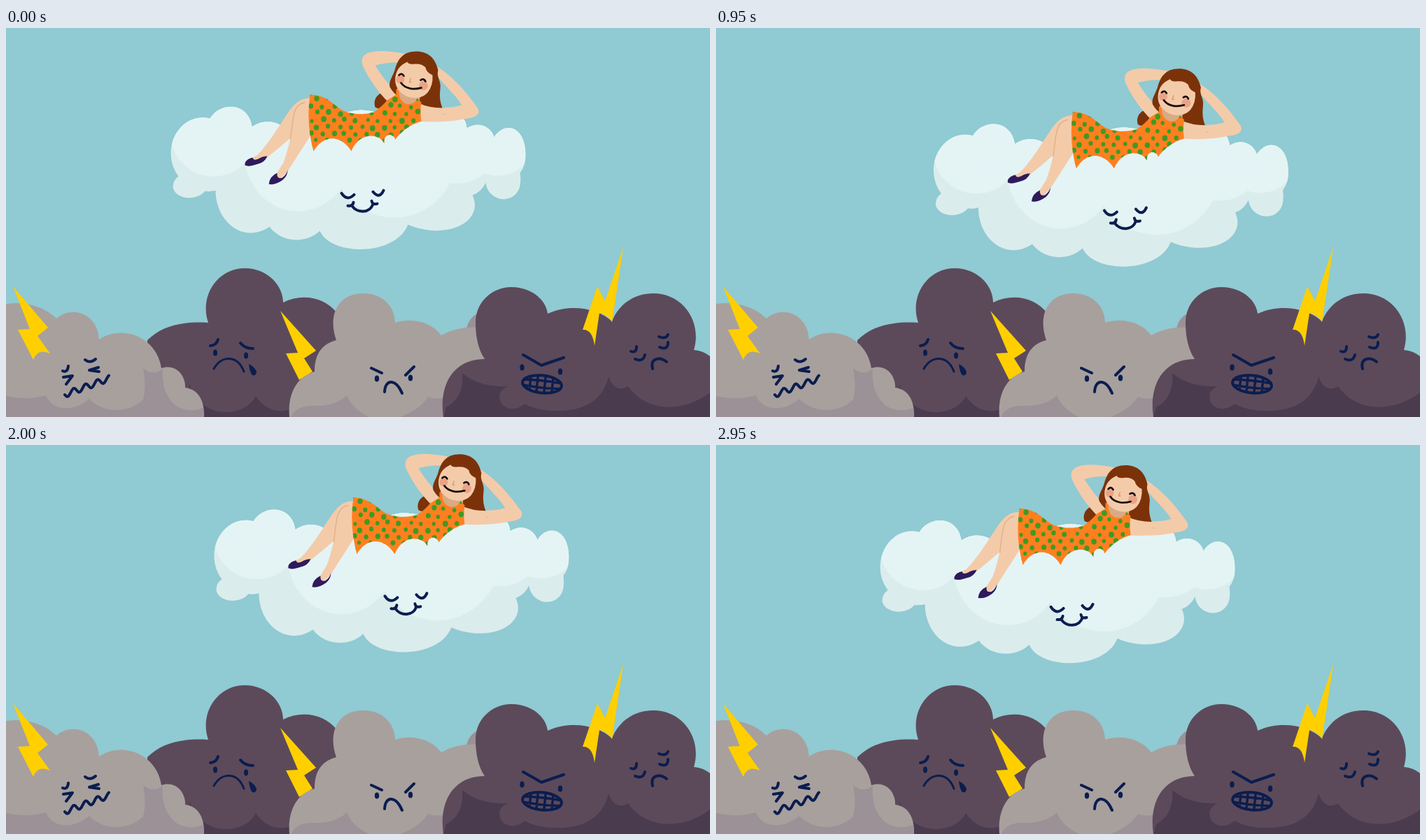
Write an HTML page that moves like this. It is 1006 by 557 pixels and loops after 3000 ms.

```html
<!DOCTYPE html>
<html lang="en">
<head>
<meta charset="utf-8">
<title>Above the storm</title>
<style>
html, body { margin: 0; width: 100%; height: 100%; overflow: hidden; background: #90cad3; }
svg { display: block; width: 100vw; height: 100vh; }
.dark { fill: #5c4a5a; }
.darkShade { fill: #4a3b4f; }
.gray { fill: #a8a09d; }
.grayShade { fill: #9c9197; }
.bolt { fill: #ffcf00; }
.skin { fill: #f4cba9; }
.hair { fill: #7c3209; }
.shoe { fill: #2f1a5c; }
.ink { fill: #0b1d4f; }
.line { fill: none; stroke: #0b1d4f; stroke-width: 4; stroke-linecap: round; stroke-linejoin: round; }
</style>
</head>
<body>
<svg viewBox="0 0 1006 557" preserveAspectRatio="none">
  <defs>
    <path id="puff" d="M236 180C236 148 262 122 292 130C308 104 348 108 352 142C366 132 384 132 398 143L440 146Q480 118 509 118Q535 119 560 134L594 134L654 130Q658 135 659 144C674 134 693 140 698 157C712 133 743 140 743 182Q743 198 735 208Q737 221 734 230C724 255 689 248 686 222Q680 235 667 240C674 254 670 268 658 278C638 294 602 294 575 282C557 328 464 327 449 291C429 310 394 308 377 285C341 310 300 279 300 233Q293 235 285 234C273 249 243 246 239 229Q239 218 247 213Q236 198 236 180Z"/>
    <path id="dress" d="M435 96C461 96 470 114 485 120Q505 127 526 121Q539 112 545 104L558 96V88L562 90C561 113 584 114 588 101L594 107Q592 121 594 134Q571 141 557 160C553 149 539 152 541 166C535 151 505 148 494 177C480 153 454 152 440 177Q429 137 435 96Z"/>
    <clipPath id="puffClip"><use href="#puff"/></clipPath>
    <clipPath id="dressClip"><use href="#dress"/></clipPath>
  </defs>

  <g id="storm">
    <path class="dark" d="M202 447C224 425 254 420 289 422C276 384 302 344 341 344C374 344 396 369 396 393C424 379 456 386 473 408L500 557H200Z"/>
    <path class="darkShade" d="M262 510C270 535 290 550 314 550C334 550 350 541 357 527C368 545 388 553 407 546V557H262Z"/>
    <path class="bolt" d="M392 405L443 462L426 473L438 492L419 504L400 466L417 465Z"/>

    <path class="gray" d="M0 395C30 391 56 400 72 416C96 396 131 410 133 446C168 423 216 444 222 487C242 480 257 497 256 515C273 517 284 531 283 557H0Z"/>
    <path class="grayShade" d="M0 527Q29 534 57 526C65 547 94 552 119 531C138 552 176 552 196 532Q201 514 196 487Q210 499 224 488Q221 523 243 541Q261 552 282 544L283 557H0Z"/>
    <path class="bolt" d="M10 370L60 429L45 441L63 466Q45 458 39 475L17 432L34 431Z"/>

    <path class="grayShade" d="M658 430Q661 415 675 408L690 445H658Z"/>
    <path class="gray" d="M405 557C402 525 415 499 441 492C441 465 453 452 472 447C460 414 472 380 511 380C539 380 556 400 556 422C580 414 608 421 622 440Q646 426 678 429L700 480V557Z"/>
    <path class="grayShade" d="M407 557Q415 540 440 541Q470 542 487 526Q495 546 519 557ZM563 557Q591 547 603 528Q614 533 627 529V557Z"/>

    <path class="dark" d="M625 557C618 510 640 474 684 474C675 461 671 442 671 422C671 393 694 371 722 371C750 371 771 388 774 409C806 394 846 401 866 420C876 395 898 380 925 380C967 380 995 420 983 461Q996 462 1006 470V557Z"/>
    <path class="darkShade" d="M652 494Q676 515 718 513Q709 516 706 523C701 543 725 553 741 538Q763 550 796 548C831 546 854 530 861 499Q870 524 889 513C916 552 970 550 1006 522V557H625L629 543Q655 529 652 494Z"/>
    <path class="bolt" d="M882 314L866 421Q860 411 848 408L841 455Q838 431 824 432L845 370L856 391Z"/>

    <g class="line">
      <path d="M81 491Q88 494 89 484M113 475Q120 481 128 474M82 500L95 498L86 510M132 486L119 490L133 492"/>
      <path id="wobble"/>
      <path d="M292 455Q301 454 303 446M335 451Q341 459 353 459"/>
      <path d="M297 488C308 468 331 468 340 492" stroke-width="3"/>
      <path d="M522 487L537 494M571 497L583 485M541 521C542 502 557 502 566 523"/>
      <path d="M739 468L765 483L797 472"/>
      <path d="M893 463Q901 466 901 456M933 442Q943 446 946 439M899 474Q910 479 913 468M934 457Q946 462 946 450M924 488C920 473 934 470 944 478"/>
      <g transform="translate(766 510) rotate(6)">
        <ellipse rx="28" ry="12.5"/>
        <path stroke-width="3.4" d="M-27 -4Q0 -6 27 -4M-26 4Q0 6 26 4M-17 -9V9M-7 -11V11M4 -11V11M15 -10V10"/>
      </g>
    </g>
    <g class="ink">
      <ellipse cx="299" cy="465" rx="3" ry="4.5"/><ellipse cx="343" cy="469" rx="3" ry="4.5"/>
      <ellipse cx="530" cy="502" rx="3.2" ry="4.5"/><ellipse cx="578" cy="501" rx="3.2" ry="4.5"/>
      <ellipse cx="737.5" cy="486" rx="3.2" ry="4.5"/><ellipse cx="792" cy="492" rx="3.2" ry="4.5"/>
      <path d="M347 481Q358 487 358 494Q355 500 351 496Q348 491 347 481Z"/>
    </g>
  </g>

  <g id="floater">
    <use href="#puff" fill="#dbecec"/>
    <g clip-path="url(#puffClip)" fill="#e4f4f5">
      <ellipse cx="297" cy="150" rx="62" ry="63"/>
      <ellipse cx="418" cy="180" rx="77" ry="83"/>
      <ellipse cx="555" cy="180" rx="90" ry="92"/>
      <ellipse cx="645" cy="165" rx="60" ry="58"/>
      <ellipse cx="703" cy="170" rx="48" ry="42"/>
      <path d="M290 100H700V180H290Z"/>
    </g>
    <path class="line" d="M480 237Q488 249 498 239M525 235Q534 246 540 233M489 255Q496 256 497 250M495 255C502 266 521 266 525 252M523 248Q524 254 531 252"/>

    <path class="skin" d="M436 101C420 100 411 111 404 121C390 142 375 167 360 182L347 190L352 194L371 188Q390 173 407 158Q402 180 397 193L384 214L390 218L402 207Q420 179 436 154Z"/>
    <path d="M428 107C411 110 411 125 407 160" fill="none" stroke="#e0b28c" stroke-width="1.5"/>
    <path class="shoe" d="M342 194Q344 188 353 186Q354 191 361 188Q367 184 374 184Q370 193 361 195Q347 200 342 197Z"/>
    <path class="shoe" d="M376 224Q377 213 388 208Q387 217 395 215Q401 211 403 204Q403 212 396 218Q385 226 376 224Z"/>

    <path class="hair" d="M541 92C529 95 525 105 528 114Q536 119 549 109L565 99V80Z"/>
    <path class="skin" d="M574 38C545 32 527 32 516 37C507 42 508 51 512 58C520 75 533 93 547 107L560 95C546 80 535 66 528 54Q545 49 563 50Z"/>
    <path class="skin" d="M615 55C638 68 661 95 675 116Q680 127 660 130Q627 137 590 134V109Q623 119 652 111C644 98 629 84 617 70Z"/>
    <path d="M625 124h3" stroke="#e0b28c"/>
    <path class="hair" d="M587 34C567 34 560 46 556 61C553 70 547 77 549 85Q554 94 562 99L590 108Q605 115 624 115Q619 103 621 88C623 76 615 71 618 61C614 43 603 34 587 34Z"/>
    <path fill="#d9aa84" d="M559 87L592 98L591 112H563Z"/>
    <path class="skin" d="M557 70C559 60 563 54 574 49Q576 53 584 52Q595 51 600 57Q601 64 610 68Q611 83 603 93C592 105 573 102 563 91C557 84 556 77 557 70Z"/>
    <g fill="#eba387"><circle cx="564" cy="74" r="6"/><circle cx="597" cy="83" r="6.5"/></g>
    <path d="M579 72L577 78L580 78" fill="none" stroke="#df9b74" stroke-width="1.5"/>
    <g fill="none" stroke="#160d0b" stroke-width="2.7" stroke-linecap="round">
      <path d="M562 68Q566 64 569 69M593 75Q598 72 600 77"/>
      <path d="M565 79C571 88 584 89 594 86"/>
    </g>

    <use href="#dress" fill="#ff7f1f"/>
    <g id="dots" fill="#3f9a22" clip-path="url(#dressClip)"></g>
  </g>
</svg>
<script>
const LOOP = 3000, STEP = 50;
const $ = id => document.getElementById(id);

// Seeded random numbers between -1 and 1
let seed = 7;
function jitter() {
  seed = seed * 16807 % 2147483647;
  return seed / 1073741823.5 - 1;
}

// Staggered, slightly uneven dots; the dress clips them
function dressDots() {
  let out = '';
  for (let row = 0; row < 9; row++) {
    for (let x = 437 + row % 2 * 8; x < 596; x += 16) {
      const cx = x + 2 * jitter(), cy = 92 + row * 10 + 2 * jitter();
      const r = 3.2 + 0.7 * jitter();
      out += `<ellipse cx="${cx.toFixed(1)}" cy="${cy.toFixed(1)}" rx="${r.toFixed(1)}" ry="${(r + 0.3).toFixed(1)}"/>`;
    }
  }
  return out;
}

// Wavy mouth rising to the right
function wavyMouth() {
  const points = [];
  for (let d = 0; d <= 63; d++) {
    points.push(`${84 + d} ${(525 - 0.37 * d + 4.3 * Math.sin(d * Math.PI * 2 / 17)).toFixed(1)}`);
  }
  return 'M' + points.join('L');
}

// Closed drift: a wide ellipse bent by two weaker overtones
function drift(t) {
  const a = t / LOOP * Math.PI * 2, { cos, sin } = Math;
  return [
    47.8 - 44.9 * cos(a) + 9.1 * sin(a) - 2.2 * cos(2 * a) - sin(2 * a) - 1.2 * cos(3 * a) + 1.8 * sin(3 * a),
    0.5 + 0.8 * cos(a) + 29.6 * sin(a) - 1.7 * cos(2 * a) + 4.6 * sin(2 * a) + 2 * sin(3 * a)
  ];
}

function draw(now) {
  const t = Math.floor((now % LOOP) / STEP) * STEP;
  const [x, y] = drift(t);
  $('floater').setAttribute('transform', `translate(${x.toFixed(2)} ${y.toFixed(2)})`);
}

let start;
function tick(now) {
  start ??= now;
  draw(now - start);
  requestAnimationFrame(tick);
}

$('dots').innerHTML = dressDots();
$('wobble').setAttribute('d', wavyMouth());
draw(0);
requestAnimationFrame(tick);
</script>
</body>
</html>
```
